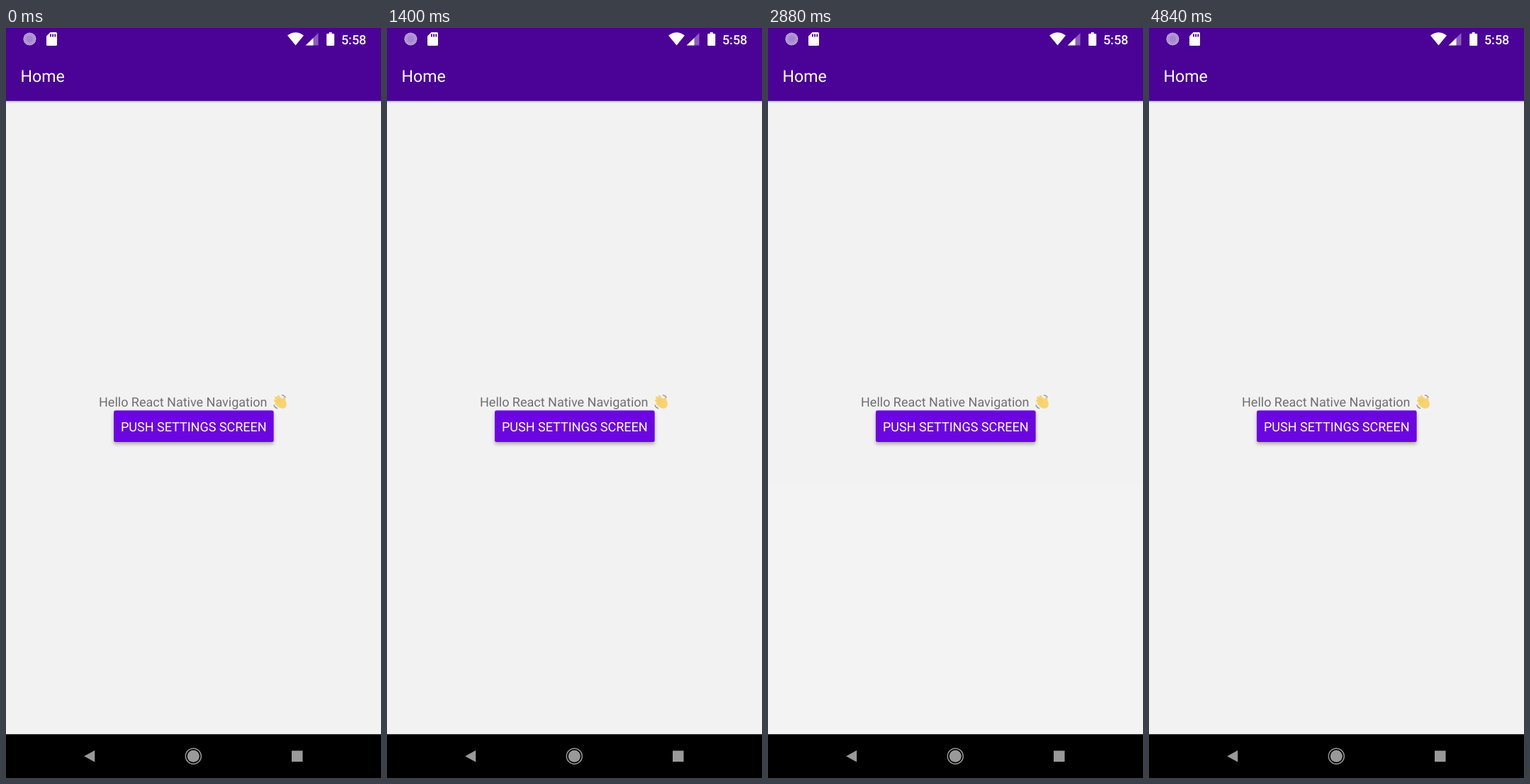
Recreate the animation shown at these times as an HTML page. Size 529 by 1058 pixels, loop 4880 ms.

```html
<!DOCTYPE html>
<html lang="en">
<head>
<meta charset="utf-8">
<title>Stack navigation</title>
<style>
  html, body { margin: 0; width: 100%; height: 100%; overflow: hidden; background: #000; }
  svg { display: block; width: 100%; height: 100%; }
  text { font: 18px Roboto, sans-serif; text-rendering: geometricPrecision; }
  .title { font-size: 23.14px; fill: #fff; }
  .clock { font-weight: 500; fill: #fff; }
  .body { fill: #6f6f70; }
  .bar { fill: #4b0297; }
  .page { fill: #f3f2f3; }
  .button { fill: #6b06e2; filter: drop-shadow(0 3px 2.5px rgba(0, 0, 0, .3)); }
  .header { filter: drop-shadow(0 1.5px 1.5px rgba(0, 0, 0, .3)); }
  .icon { fill: #fff; }
  .nav { fill: #999; }
</style>
</head>
<body>
<svg viewBox="0 0 529 1058">
  <rect class="page" width="529" height="1058"/>

  <g id="home">
    <text class="body" x="131" y="534">Hello React Native Navigation</text>
    <g id="wave" stroke-linecap="round" fill="none">
      <ellipse cx="389" cy="529.500" rx="6.500" ry="7.500" fill="#f8d36f" transform="rotate(-35 389 529.500)"/>
      <path d="M384 519.500L390 527M380.500 521.500L388 529M379.500 525.500L386 531M381 530L386 534M392.500 522L393 530"
        stroke="#f8d36f" stroke-width="3.200"/>
      <path d="M382.500 521.500L387 527M380.500 524.500L385 529" stroke="#e9bd5c" stroke-width=".7"/>
      <path d="M389.500 518q3.500 .5 4.500 3M378 532q1 3.500 4.500 4.500" stroke="#98989c" stroke-width="1.400"/>
    </g>
    <rect class="button" x="152" y="539.500" width="225.600" height="44.500" rx="2.500"/>
    <text x="264.800" y="569" text-anchor="middle" fill="#fff">PUSH SETTINGS SCREEN</text>
  </g>

  <g id="settings" opacity="0">
    <rect class="page" y="102" width="529" height="895"/>
    <text class="body" x="264.500" y="560" text-anchor="middle">Settings Screen</text>
  </g>

  <rect class="bar header" x="-6" y="-6" width="541" height="108.860"/>
  <text id="homeTitle" class="title" x="20.600" y="76">Home</text>
  <g id="settingsTitle" visibility="hidden">
    <path class="icon" transform="translate(20.600 51.600) scale(1.286)"
      d="M20 11H7.830l5.590-5.590L12 4l-8 8 8 8 1.410-1.410L7.830 13H20z"/>
    <text class="title" x="92.600" y="76">Settings</text>
  </g>

  <g id="status">
    <circle cx="33.400" cy="15.500" r="8.800" fill="#a688ce"/>
    <g fill="none" stroke="#e3d9f0" stroke-width="1.200" stroke-dasharray="1.300 1.200">
      <circle cx="33.400" cy="15.500" r="8.300"/>
      <circle cx="33.400" cy="15.500" r="5.800" opacity=".6"/>
    </g>
    <path class="icon" d="M62.500 6H70.500Q72 6 72 7.500V23.500Q72 25 70.500 25H58.500Q57 25 57 23.500V11.500z"/>
    <path class="bar" d="M62 8.500h1.800v4H62zM65.200 8.500H67v4h-1.800zM68.400 8.500h1.800v4h-1.800z"/>
    <path class="icon" d="M408.500 24.500L397 10.500Q408.500 2 420 10.500z"/>
    <path class="icon" d="M422.700 24.500L440.500 7V24.500z" opacity=".36"/>
    <path class="icon" d="M422.700 24.500L433.500 14V24.500z"/>
    <path class="icon" d="M455.700 6h4v2H462.200q1 0 1 1v15q0 1-1 1H453.200q-1 0-1-1V9q0-1 1-1h2.500z"/>
    <text class="clock" x="472.900" y="22.800">5:58</text>
  </g>

  <rect y="996.250" width="529" height="62"/>
  <path class="nav" d="M110.200 1027.200L125.200 1019V1035.400z"/>
  <circle cx="264.300" cy="1027.200" r="11" fill="none" stroke="#999" stroke-width="1.400"/>
  <circle class="nav" cx="264.300" cy="1027.200" r="8.500"/>
  <rect class="nav" x="403" y="1019.500" width="15.500" height="15.500"/>
</svg>
<script>
  const LOOP = 4880, STEP = 40, HEIGHT = 1058;
  const PUSH = 1440, POP = 2680, DURATION = 279;
  const byId = id => document.getElementById(id);
  const settings = byId('settings');
  const progress = (time, start) => Math.min(1, Math.max(0, (time - start) / DURATION));
  const show = (id, on) => byId(id).setAttribute('visibility', on ? 'visible' : 'hidden');

  // Push decelerates into place, pop accelerates away.
  function hiddenShare(time) {
    return time < POP ? (1 - progress(time, PUSH)) ** 2 : progress(time, POP) ** 2;
  }

  function draw(now) {
    const time = Math.floor(now % LOOP / STEP) * STEP;
    const hidden = hiddenShare(time);
    const onSettings = time > PUSH && time <= POP;
    settings.setAttribute('opacity', 1 - hidden);
    settings.setAttribute('transform', `translate(0 ${hidden * HEIGHT})`);
    show('homeTitle', !onSettings);
    show('settingsTitle', onSettings);
  }

  const origin = performance.now();
  function tick() {
    draw(performance.now() - origin);
    requestAnimationFrame(tick);
  }
  tick();
</script>
</body>
</html>
```
